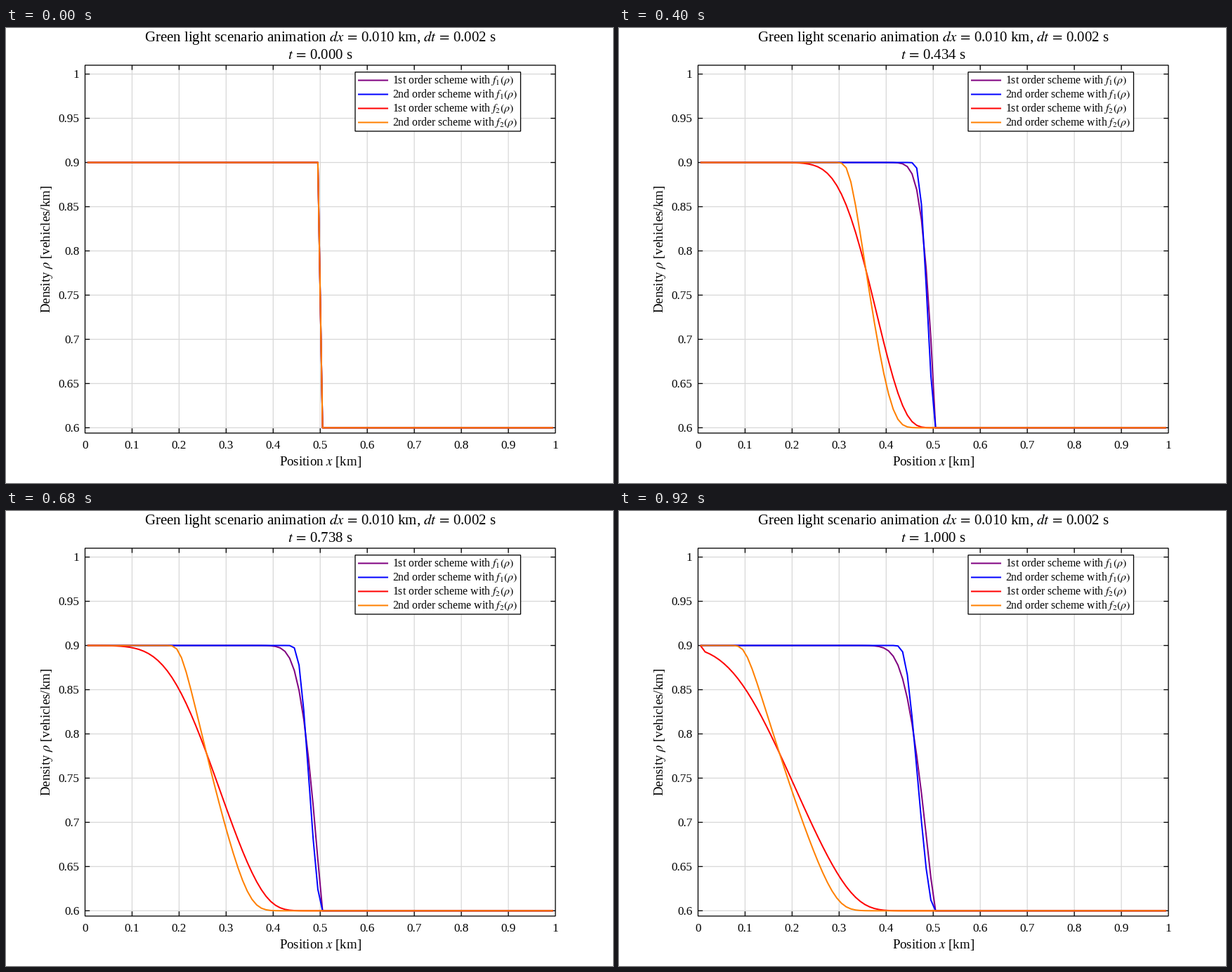
Write a matplotlib script that moves like this. It is 864 px wide and 648 px high and loops after 0.96 s.

```python
import numpy as np
import matplotlib.pyplot as plt
from matplotlib.animation import FuncAnimation
from matplotlib.patches import Rectangle

W, H = 864, 648
FRAMES, INTERVAL = 24, 40
DX, DT, STEPS = 0.01, 0.002, 500

LEFT, RIGHT, BOTTOM, TOP = 112.5, 782, 576.9, 53
Y_MIN, Y_MAX = 0.594, 1.01
TICK, LABEL, TITLE, LEGEND = 17.2, 18.9, 20.85, 15.8
GRID = "#d9d9d9"

plt.rcParams["font.family"] = "Liberation Serif"
plt.rcParams["mathtext.fontset"] = "stix"

x = DX * (np.arange(100) + 0.5)


def flux_1(u):
    return u * (1 - u) / 15


def flux_2(u):
    return -0.4333 * u * np.log(u)


def rate(u, flux, limited):
    """Upwind differences for left-going waves, with van Leer slopes if limited."""
    face = u.copy()
    if limited:
        a = u[1:-1] - u[2:]
        b = u[:-2] - u[1:-1]
        face[1:-1] += np.maximum(a * b, 0) / (np.abs(a + b) + 1e-12)
    f = flux(face)
    du = np.zeros_like(u)
    du[1:-1] = -(f[2:] - f[1:-1]) / DX
    return du


def solve(flux, order):
    u = np.where(x < 0.5, 0.9, 0.6)
    history = [u]
    for _ in range(STEPS):
        k = rate(u, flux, order == 2)
        if order == 2:
            k = (k + rate(u + DT * k, flux, True)) / 2
        u = u + DT * k
        history.append(u)
    return history


curves = [
    ("1st", 1, "#800080", solve(flux_1, 1)),
    ("2nd", 1, "#0000ff", solve(flux_1, 2)),
    ("1st", 2, "#ff0000", solve(flux_2, 1)),
    ("2nd", 2, "#ff8000", solve(flux_2, 2)),
]

fig = plt.figure(figsize=(W / 72, H / 72), dpi=72, facecolor="white")
ax = fig.add_axes([0, 0, 1, 1])


def line(xs, ys, color="black", lw=1.3, z=2):
    ax.plot(xs, ys, color=color, lw=lw, zorder=z, snap=False,
            solid_capstyle="butt", solid_joinstyle="round")


def box(x0, y0, x1, y1, z, face="none"):
    ax.add_patch(Rectangle((x0, y0), x1 - x0, y1 - y0, facecolor=face,
                           edgecolor="black", lw=1.3, zorder=z, snap=False))


def text(px, py, s, size, ha="center", **kw):
    ax.text(px, py, s, fontsize=size, ha=ha, va="baseline", zorder=8, **kw)


def to_px(v):
    return LEFT + (RIGHT - LEFT) * v


def to_py(v, top):
    return BOTTOM - (BOTTOM - top) * (v - Y_MIN) / (Y_MAX - Y_MIN)


def draw_axes(top):
    for v in np.arange(11) / 10:
        px = to_px(v)
        if 0 < v < 1:
            line([px, px], [top, BOTTOM], GRID, z=1)
            line([px, px], [BOTTOM, BOTTOM - 6.7])
            line([px, px], [top, top + 6.7])
        text(px, 599.4, f"{v:g}", TICK)
    for v in np.arange(12, 21) / 20:
        py = to_py(v, top)
        line([LEFT, RIGHT], [py, py], GRID, z=1)
        line([LEFT, LEFT + 6.7], [py, py])
        line([RIGHT, RIGHT - 6.7], [py, py])
        text(104.3, py + 5.7, f"{v:g}", TICK, ha="right")
    box(LEFT, top, RIGHT, BOTTOM, 2)
    text(447.2, 623.4, "Position $x$ [km]", LABEL)
    text(63.3, (top + BOTTOM) / 2, r"Density $\rho$ [vehicles/km]", LABEL,
         rotation=90, rotation_mode="anchor")


def draw_legend(top):
    box(497, top + 9.8, 732.5, top + 94, 6, "white")
    for i, (order, n, color, _) in enumerate(curves):
        py = top + 21.5 + 20 * i
        line([501, 544], [py, py], color, 2, 7)
        text(549.5, py + 5, rf"{order} order scheme with $f_{n}(\rho)$",
             LEGEND, ha="left")


def draw(k):
    step = STEPS * k // (FRAMES - 1)
    clock = f"{step * DT:.3f}"
    # the digit 9 reaches lowest and pushes the layout down
    shift = 2 if "9" in clock else 0
    top = TOP + shift

    ax.clear()
    ax.set_xlim(0, W)
    ax.set_ylim(H, 0)
    ax.axis("off")

    draw_axes(top)
    for i, (_, _, color, history) in enumerate(curves):
        line(to_px(x), to_py(history[step], top), color, 2, 3 + i / 10)
    draw_legend(top)
    text(447.2, 18.9 + shift,
         r"Green light scenario animation $dx\,=\,$0.010 km, $dt\,=\,$0.002 s",
         TITLE)
    text(447.2, 44 + shift, rf"$t\,=\,${clock} s", TITLE)
    return []


anim = FuncAnimation(fig, draw, frames=FRAMES, init_func=lambda: [],
                     interval=INTERVAL, repeat=True, repeat_delay=0)
plt.show()
```
